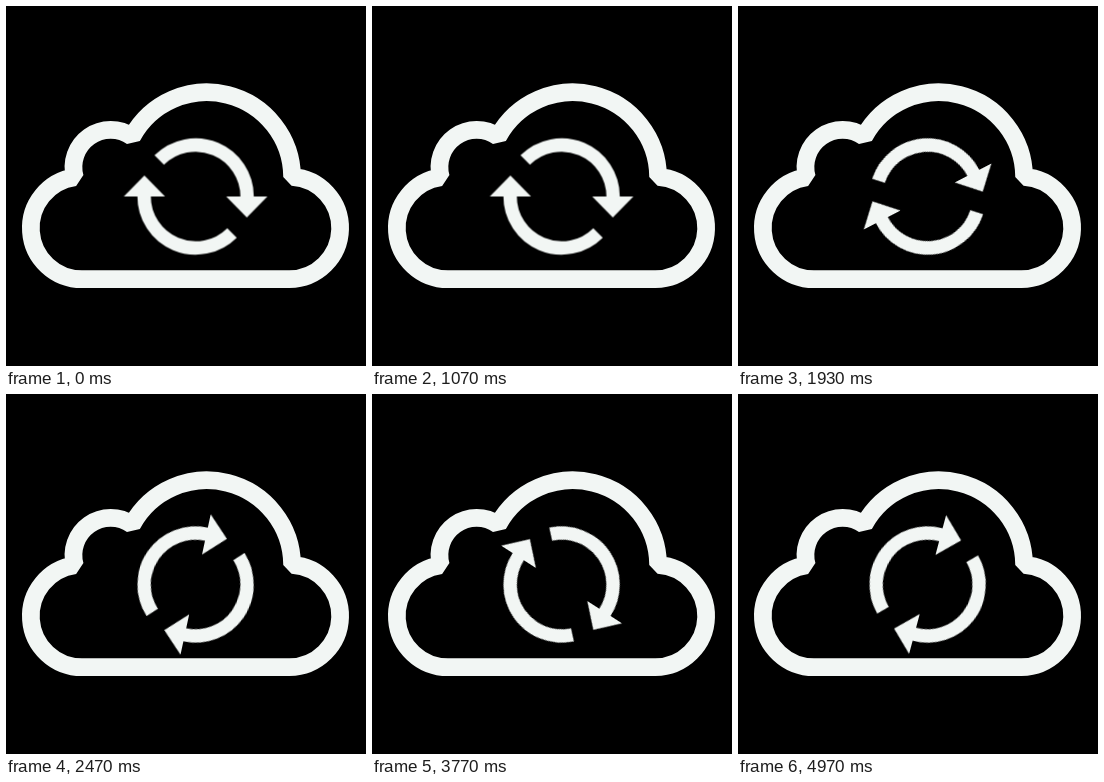
An HTML page that plays this animation: 360x360 px, repeating every 5 s.

```html
<!DOCTYPE html>
<html lang="en">
<head>
<meta charset="utf-8">
<title>Cloud sync</title>
<style>
  html, body { margin: 0; width: 100%; height: 100%; overflow: hidden; background: #000; }
  svg { display: block; width: 100vw; height: 100vh; }
  .line { fill: none; stroke: #f2f6f4; stroke-linejoin: bevel; }
  .head { fill: #f2f6f4; }
</style>
</head>
<body>
<svg viewBox="0 0 360 360">
  <defs>
    <g id="arrow">
      <path class="line" stroke-width="13.4" d="M-36.4 -36.4A51.5 51.5 0 0 1 51.5 .5"/>
      <path class="head" d="M30.6 0H71.8L51.2 20.9Z"/>
    </g>
  </defs>
  <path class="line" stroke-width="17.7" d="M76 273.2
    A51.2 51.2 0 0 1 68.9 171.3
    A37.2 37.2 0 0 1 126.1 130.7
    A85.2 85.2 0 0 1 286.1 170.9
    A51.2 51.2 0 0 1 283.4 273.2Z"/>
  <g transform="translate(189.6 190.5)">
    <g id="wheel">
      <use href="#arrow"/>
      <use href="#arrow" transform="rotate(180)"/>
    </g>
  </g>
</svg>
<script>
  const LOOP = 5000;
  const TICK = 1000 / 30;
  const TURN_TICKS = 32;   // a new turn begins after this many ticks
  const POSE = 50;         // the wheel advances in poses of 50 ms

  const spin = document.getElementById('wheel').animate(
    [{ transform: 'rotate(0deg)' }, { transform: 'rotate(360deg)' }],
    { duration: 22 * POSE, easing: 'cubic-bezier(.393, .08, .511, 1)', fill: 'both' }
  );
  spin.pause();

  const start = performance.now();

  function draw() {
    const time = (performance.now() - start) % LOOP;
    const tick = Math.min(149, Math.floor((time + 3.4) / TICK));
    const pose = Math.round((tick % TURN_TICKS) * TICK / POSE);
    spin.currentTime = pose * POSE;
    requestAnimationFrame(draw);
  }
  draw();
</script>
</body>
</html>
```
